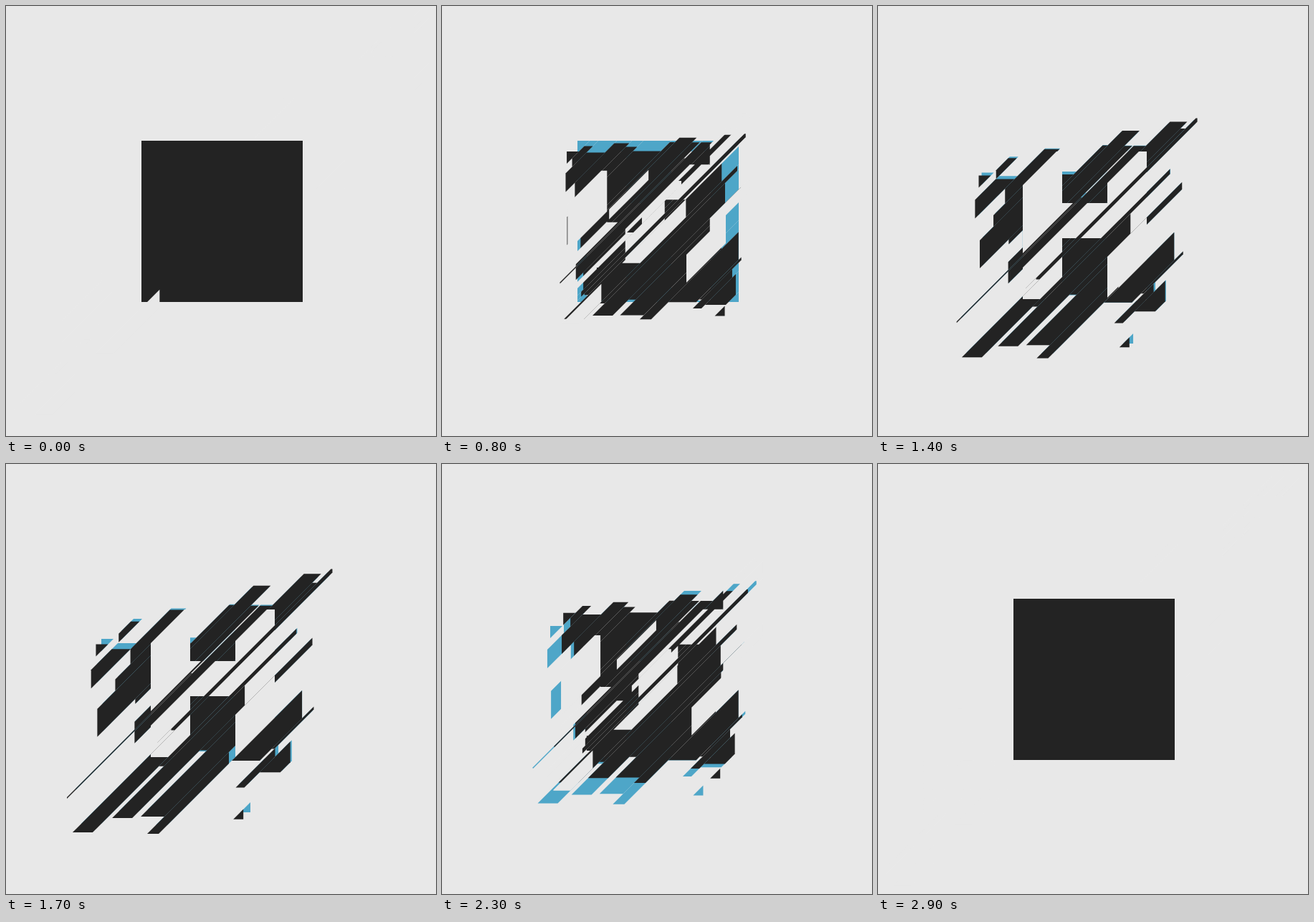
An HTML page for the animation above (3100 ms loop, 600 by 600 pixels).

```html
<!DOCTYPE html>
<html lang="en">
<head>
<meta charset="utf-8">
<title>Sliced square</title>
<style>
html, body { margin: 0; width: 100%; height: 100%; overflow: hidden; background: #e8e8e8; }
svg { display: block; width: 100vw; height: 100vh; }
</style>
</head>
<body>
<svg viewBox="0 0 600 600">
  <g id="blue" fill="#4ea6c8"></g>
  <path id="rest" fill="#e8e8e8"/>
  <g id="dark" fill="#232323"></g>
  <rect id="solid" x="189" y="188" width="225" height="225" fill="#232323"/>
  <path id="light" fill="#e8e8e8"/>
</svg>
<script>
const LOOP = 3100, STEP = 100, REACH = 108;
const $ = id => document.getElementById(id);

// Boxes: left, top, right, bottom and the first diagonal (x + y) they show
const SQUARE = [189, 188, 414, 413, 377];
const LETTER = [
  [202, 203, 257, 409, 452],
  [320, 203, 375, 411, 548],
  [240, 275, 340, 324, 515]
];

// Diagonal bands of the square: where each starts, its furthest slide down left
const BANDS = pairUp([
  [377, 66], [394, 33], [406, 73], [432, 16], [453, 38], [469, 64],
  [508, 9], [515, -19], [539, 10], [550, REACH], [552, 10], [569, -36],
  [593, -23], [600, -43], [607, 105], [635, 9], [642, 84], [670, -14],
  [680, 82], [713, 107], [729, 1], [768, -16], [772, 40], [784, 18], [813, 86]
]);

// Diagonal bands of the letter: start, slide up right (0 leaves the band uncut)
const CUTS = pairUp([
  [452, -84], [517, 98], [531, -84], [547, 0], [567, 169], [574, -129],
  [583, 169], [600, 0], [607, 169], [610, -109], [635, 0], [670, 169],
  [688, 66], [727, 0]
]).filter(band => band.amp);

function pairUp(list) {
  return list.map(([from, amp], i) =>
    ({ from, to: i + 1 < list.length ? list[i + 1][0] : 827, amp }));
}

const clamp = v => Math.min(1, Math.max(0, v));
const ramp = (t, from, to) => clamp((t - from) / (to - from));
const smooth = u => u * u * (3 - 2 * u);

// Rises to 1 at the peak, then falls back to 0
const pulse = (t, start, peak, end, up, down) => t < peak
  ? ramp(t, start, peak) ** up
  : (1 - ramp(t, peak, end)) ** down;

const darkShift = t => pulse(t, 600, 1750, 2900, .85, 1.85);
const blueShift = t => pulse(t, 800, 2000, 2900, .57, 1.36);
const cutShift = t => 1.5 * (1 - smooth(ramp(t, -100, 1180)))
  + 1.65 * smooth(ramp(t, 2000, 2900));

// Part of a box between two diagonals, moved by d up and to the right
function slice([l, t, r, b, first], from, to, d) {
  const lo = Math.max(from, l + t, first), hi = Math.min(to, r + b);
  if (lo >= hi) return "";
  const low = s => { const x = Math.max(l, s - b); return [x, s - x]; };
  const high = s => { const x = Math.min(r, s - t); return [x, s - x]; };
  const inside = s => s > lo && s < hi;
  const pts = [low(lo), high(lo)];
  if (inside(r + t)) pts.push([r, t]);
  pts.push(high(hi), low(hi));
  if (inside(l + b)) pts.push([l, b]);
  return "M" + pts.map(([x, y]) => (x + d).toFixed(2) + " " + (y - d).toFixed(2)).join("L") + "Z";
}

const letter = (from, to, d) => LETTER.map(box => slice(box, from, to, d)).join("");

function makeBands(group) {
  return BANDS.map(() => group.appendChild(
    document.createElementNS("http://www.w3.org/2000/svg", "path")));
}
const blue = makeBands($("blue")), dark = makeBands($("dark"));
$("rest").setAttribute("d", letter(0, 1200, 0));

function slide(paths, amount) {
  BANDS.forEach(({ from, to, amp }, i) =>
    paths[i].setAttribute("d", slice(SQUARE, from, to, -amp * amount)));
}

function draw(time) {
  const t = Math.floor(time % LOOP / STEP) * STEP;
  const p = darkShift(t), q = cutShift(t);
  slide(blue, blueShift(t));
  slide(dark, p);
  $("solid").style.display = p ? "none" : "";
  $("light").setAttribute("d",
    CUTS.map(({ from, to, amp }) => letter(from, to, amp * q)).join(""));
}

const start = performance.now();
function tick() {
  draw(performance.now() - start);
  requestAnimationFrame(tick);
}
tick();
</script>
</body>
</html>
```
